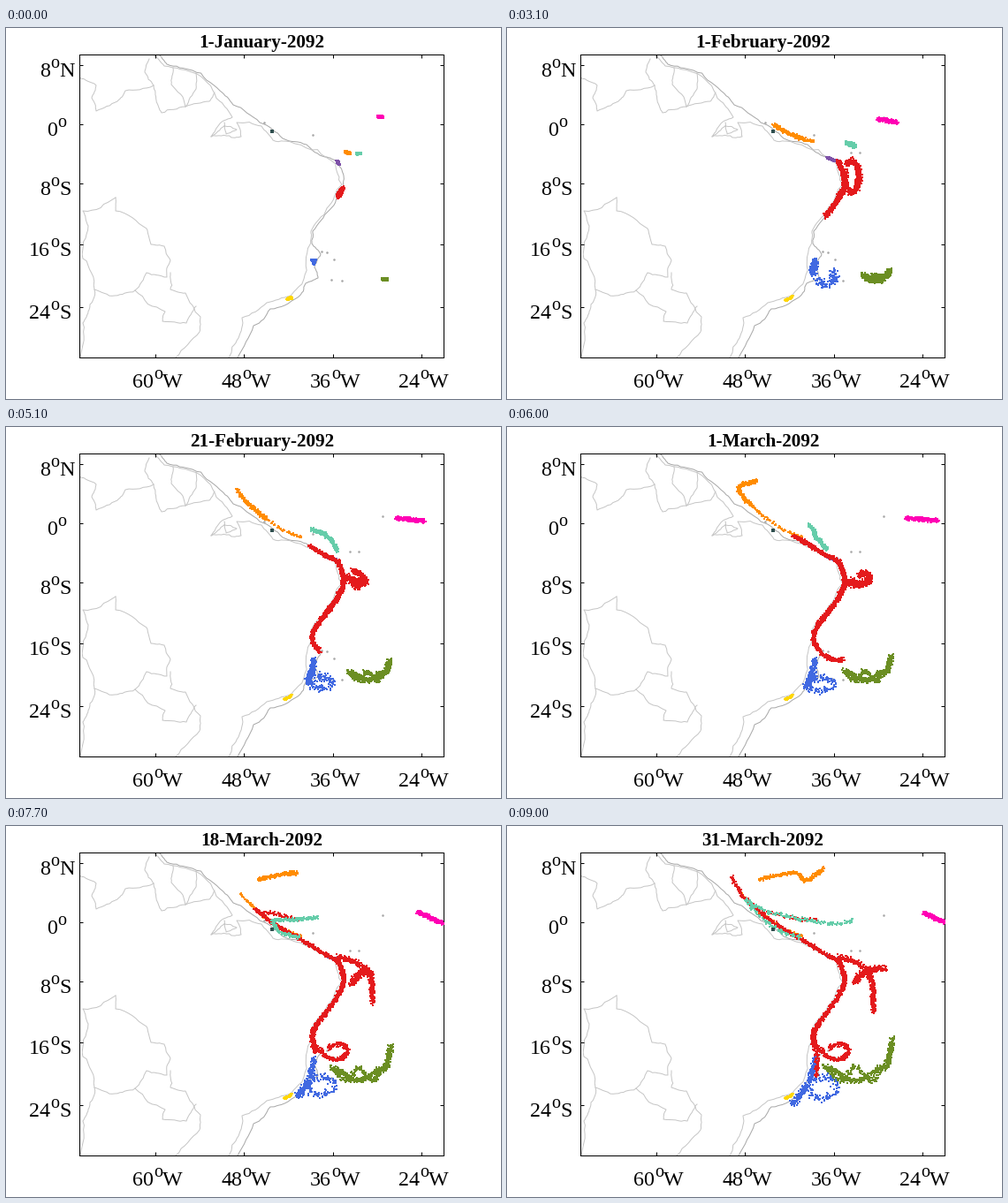
A matplotlib script for the animation above (9.1 s loop, 560 by 420 pixels).

```python
import matplotlib.pyplot as plt
import numpy as np
from matplotlib.animation import FuncAnimation

W, H = 560, 420
PX = 0.72  # points per pixel at 100 dpi
X0, Y0, X1, Y1 = 83, 30, 495, 373  # map frame in pixels
DAYS = 91
rng = np.random.default_rng(7)

fig = plt.figure(figsize=(5.6, 4.2), dpi=100, facecolor="white")
ax = fig.add_axes([X0 / W, 1 - Y1 / H, (X1 - X0) / W, (Y1 - Y0) / H])
ax.set_xlim(X0 + 1, X1 + 1)
ax.set_ylim(Y1 + 1, Y0 + 1)
for spine in ax.spines.values():
    spine.set_linewidth(PX)


# ---- labels and Mercator ticks ---------------------------------------

SCALE = 8.37  # pixels per degree of longitude


def lon_x(lon):
    return 170 + (lon + 60) * SCALE


def lat_y(lat):
    return 110 - np.degrees(np.arcsinh(np.tan(np.radians(lat)))) * SCALE


def label(x, y, text, size, **kw):
    return fig.text(x / W, 1 - y / H, text, fontsize=size * PX,
                    family="Liberation Serif", va="baseline", **kw)


def degrees(x, y, value, side):
    """Number, raised small o, compass letter."""
    number = str(abs(value))
    label(x, y, number, 24)
    x += 12 * len(number)
    label(x, y - 10, "o", 20)
    label(x + 10, y, side, 24)


lons, lats = (-60, -48, -36, -24), (8, 0, -8, -16, -24)
ax.set_xticks([lon_x(v) for v in lons])
ax.set_yticks([lat_y(v) for v in lats])
ax.tick_params(direction="in", length=4 * PX, width=PX, top=True, right=True,
               labelbottom=False, labelleft=False)
for v in lons:
    degrees(lon_x(v) - 27, 407, v, "W")
for v in lats:
    x = 46 if v == 0 else 50 - 12 * len(str(abs(v)))
    degrees(x, lat_y(v) + 12, v, "N" if v > 0 else "S" if v else "")
title = label(289.5, 22, "", 21.2, ha="center", weight="bold")


# ---- map -------------------------------------------------------------

def outline(color, points, passes=3, amount=.06):
    """Line through key points, roughened by displaced midpoints."""
    p = np.array(points, float)
    for _ in range(passes):
        d = np.diff(p, axis=0)
        normal = np.c_[-d[:, 1], d[:, 0]]
        mid = p[:-1] + d / 2 + normal * rng.normal(0, amount, (len(d), 1))
        out = np.empty((2 * len(p) - 1, 2))
        out[::2], out[1::2] = p, mid
        p = out
    ax.plot(*p.T, color=color, lw=PX, zorder=1)


LAND, EDGE = "#c6c6c6", "#a8a8a8"
SHELF = [(174, 31), (183, 42), (212, 49), (243, 72), (258, 88), (288, 108),
         (314, 126), (341, 133), (362, 147), (376, 152), (383, 168), (383, 184),
         (367, 207), (348, 231), (347, 245), (357, 257), (350, 272), (354, 284),
         (340, 290), (331, 306), (300, 319), (281, 338), (263, 374)]
COAST = [(168, 31), (180, 44), (217, 53), (243, 84), (257, 102), (240, 113),
         (233, 124), (256, 125), (267, 124), (262, 108), (290, 112), (303, 128),
         (328, 132), (374, 155), (381, 178), (364, 205), (346, 231), (345, 246),
         (338, 285), (323, 304), (296, 312), (268, 329), (264, 352), (253, 374)]
outline(EDGE, SHELF)
outline(LAND, COAST)
outline(LAND, [(233, 124), (248, 112), (262, 116), (250, 121), (248, 108)])
# northern borders
outline(LAND, [(84, 57), (103, 66), (98, 80), (103, 95), (127, 84), (136, 72),
               (168, 66)])
outline(LAND, [(163, 36), (158, 51), (168, 66), (171, 83), (177, 97), (204, 90)])
outline(LAND, [(190, 46), (188, 65), (204, 90), (231, 84), (237, 74)])
outline(LAND, [(216, 52), (216, 70), (204, 90)])
# southern borders
outline(LAND, [(125, 193), (88, 208), (94, 225), (88, 262), (101, 297), (95, 320),
               (88, 335), (85, 374)])
outline(LAND, [(125, 193), (125, 208), (160, 228), (165, 246), (180, 248),
               (187, 264), (183, 283), (160, 278), (147, 298), (124, 304),
               (101, 297)])
outline(LAND, [(147, 298), (181, 322), (178, 333), (205, 335), (216, 316)])
outline(LAND, [(187, 278), (187, 297), (204, 301), (221, 328), (220, 345),
               (193, 374)])

islands = np.array([(348, 122), (358, 254), (364, 255), (372, 263), (369, 286),
                    (381, 287), (427, 102), (390, 142), (400, 142), (293, 108)])
ax.plot(*islands.T, "o", ms=2.6 * PX, color=EDGE, mew=0, zorder=1)


# ---- drifting particles ----------------------------------------------

STEPS = np.linspace(0, 1, 80)


def along(points, s):
    """Points at the given fractions of a path's length."""
    p = np.array(points, float)
    dist = np.r_[0, np.cumsum(np.hypot(*np.diff(p, axis=0).T))]
    return np.c_[np.interp(s * dist[-1], dist, p[:, 0]),
                 np.interp(s * dist[-1], dist, p[:, 1])]


def smooth(points):
    """Corner cutting that keeps both ends."""
    p = np.array(points, float)
    for _ in range(2):
        a, b = p[:-1], p[1:]
        cut = np.stack([.75 * a + .25 * b, .25 * a + .75 * b], 1).reshape(-1, 2)
        p = np.vstack([p[:1], cut, p[-1:]])
    return p


def arc(cx, cy, rx, ry, a0, a1):
    a = np.radians(np.linspace(a0, a1, 24))
    return np.c_[cx + rx * np.cos(a), cy + ry * np.sin(a)]


def grow(day, start, stop, end=90, power=1):
    return start + (stop - start) * min(1, day / end) ** power


def stream(route, head, tail=(0, 0)):
    """The part of a fixed route between a moving tail and head."""
    route = smooth(route)

    def path(day):
        a, b = grow(day, *tail), grow(day, *head)
        return along(route, a + (b - a) * STEPS)
    return path


def morph(poses):
    """Blend between shapes, each given with its day."""
    days = list(poses)
    shapes = [along(smooth(p), STEPS) for p in poses.values()]

    def path(day):
        i = np.clip(np.searchsorted(days, day, "right"), 1, len(days) - 1)
        k = min(1, (day - days[i - 1]) / (days[i] - days[i - 1]))
        return shapes[i - 1] * (1 - k) + shapes[i] * k
    return path


def meander(waves):
    """Wave spreading west, its east end drawn northward."""
    def path(day):
        x = grow(day, 427, 360) + STEPS * grow(day, 5, 77)
        y = 285 - grow(day, 0, 3) - grow(day, 0, 8) * np.cos(2 * np.pi * waves * STEPS)
        y -= grow(day, 0, 34, power=1.5) * np.clip(STEPS * 12 - 11, 0, 1)
        return np.c_[x, y]
    return path


class Swarm:
    """Particles scattered about a path that depends on the day."""

    def __init__(self, color, n, path, width):
        self.path, self.width = path, width
        self.s = np.clip(np.linspace(0, 1, n) + rng.normal(0, .01, n), 0, 1)
        self.noise = np.clip(rng.normal(0, 1, (n, 2)), -2, 2)
        self.line, = ax.plot([], [], "s", color=color, ms=2 * PX, mew=0, zorder=3)

    def show(self, day):
        p = along(self.path(day), self.s)
        p += self.noise * grow(day, .75, self.width, 30)
        self.line.set_data(p[:, 0], p[:, 1])


RED, ORANGE, AQUA, BLUE = "#e41a1c", "#ff8c00", "#66cdaa", "#4169e1"
OLIVE, PINK, GOLD, PURPLE = "#6b8e23", "#ff00b4", "#ffd700", "#7e52a8"

JET = [(308, 115), (285, 97), (265, 78)]
NORTH = [(376, 191)] + SHELF[7:12][::-1]
SOUTH = SHELF[9:15]
RELEASE = [(377, 190), (381, 183)]

orange_route = [(390, 143), (358, 132), (335, 127)] + JET + [
    (262, 67), (281, 63), (310, 56), (333, 53), (336, 66), (360, 49)]
arch = arc(388, 181, 6, 17, 180, 365)
loop = arc(391, 169, 8, 18, -130, 200)
crescent = arc(402, 173, 9, 11, 150, -130)

swarms = [
    Swarm(GOLD, 90, morph({0: [(319, 308), (324, 306)],
                           10: [(316, 309), (321, 308), (324, 304)]}), .7),
    Swarm(PURPLE, 110, morph({0: [(375, 152), (378, 155)],
                              17: [(363, 148), (370, 150), (378, 154)]}), .7),
    Swarm(PINK, 260, morph({0: [(422, 101), (427, 102)],
                            17: [(405, 104), (420, 108)],
                            60: [(452, 104), (488, 107)],
                            77: [(466, 98), (495, 111)],
                            90: [(472, 99), (496, 110)]}), 1.2),
    Swarm(OLIVE, 420, meander(1.1), 1.6),
    Swarm(OLIVE, 260, meander(2.2), 1.6),
    # blue: shelf column and loose eddy
    Swarm(BLUE, 220, stream([(350, 264), (347, 278), (343, 292), (324, 317)],
                            (.06, 1, 90, 1.5)), 1.9),
    Swarm(BLUE, 120, morph({0: [(347, 264), (351, 264)],
                            17: [(349, 272), (358, 290)],
                            31: arc(362, 283, 10, 8, 180, -60),
                            60: arc(356, 292, 15, 7, 180, -150),
                            90: arc(358, 297, 16, 12, 180, -150)}), 2.8),
    # orange: leading patch and the line behind it
    Swarm(ORANGE, 260, stream(orange_route, (.02, 1), (0, .68, 77, 1.3)), 1.1),
    Swarm(ORANGE, 110, stream(orange_route, (.02, .55, 51), (0, .22, 40)), .8),
    # red: south along the coast
    Swarm(RED, 800, stream(SOUTH + [(362, 262), (378, 267), (390, 256), (380, 246),
                                    (366, 252)],
                           (.23, 1, 70, 2), (.17, 0, 31)), 1.3),
    Swarm(RED, 330, stream(SOUTH + [(353, 266), (350, 284)],
                           (.3, 1, 90, 2), (.23, .1, 31)), 1.3),
    # red: offshore eddy
    Swarm(RED, 400, morph({0: RELEASE, 17: arch, 31: loop, 57: crescent,
                           77: [(377, 149), (396, 154), (414, 167), (416, 202)],
                           90: [(377, 149), (396, 154), (414, 168), (416, 212)]}),
          1.5),
    Swarm(RED, 260, morph({0: RELEASE, 17: arch, 31: loop,
                           57: [(385, 176), (398, 183), (410, 176)],
                           77: [(392, 180), (404, 164), (414, 168)],
                           90: [(395, 178), (406, 164), (428, 162)]}), 1.9),
    # red: north-west along the coast, then turning back east
    Swarm(RED, 520, stream(NORTH + JET + [(255, 58)], (.05, 1, 90, 1.8)), 1.1),
    Swarm(RED, 300, stream(NORTH + JET[:2] + [(310, 101), (330, 107), (352, 107)],
                           (.05, 1, 80, 3)), 1),
    Swarm(AQUA, 300, morph({0: [(398, 143), (402, 143)],
                            17: [(385, 149), (401, 142)],
                            31: [(385, 131), (395, 135)],
                            55: [(340, 114), (357, 120), (366, 130), (372, 143)],
                            77: [(354, 104), (325, 108), (300, 106), (307, 121),
                                 (332, 127)],
                            90: [(393, 107), (374, 113), (330, 106), (290, 97),
                                 (262, 78), (302, 118), (332, 127)]}), 1.1),
]

ax.plot([301.5], [118], "s", ms=4 * PX, color="#2f4f4f", mew=0, zorder=4)

MONTHS = (("January", 31), ("February", 29), ("March", 31))


def date(day):
    for name, length in MONTHS:
        if day < length:
            return f"{day + 1}-{name}-2092"
        day -= length


def update(day):
    title.set_text(date(day))
    for swarm in swarms:
        swarm.show(day)
    return [title] + [swarm.line for swarm in swarms]


anim = FuncAnimation(fig, update, frames=DAYS, interval=100, repeat=True,
                     repeat_delay=0, blit=False)
plt.show()
```
